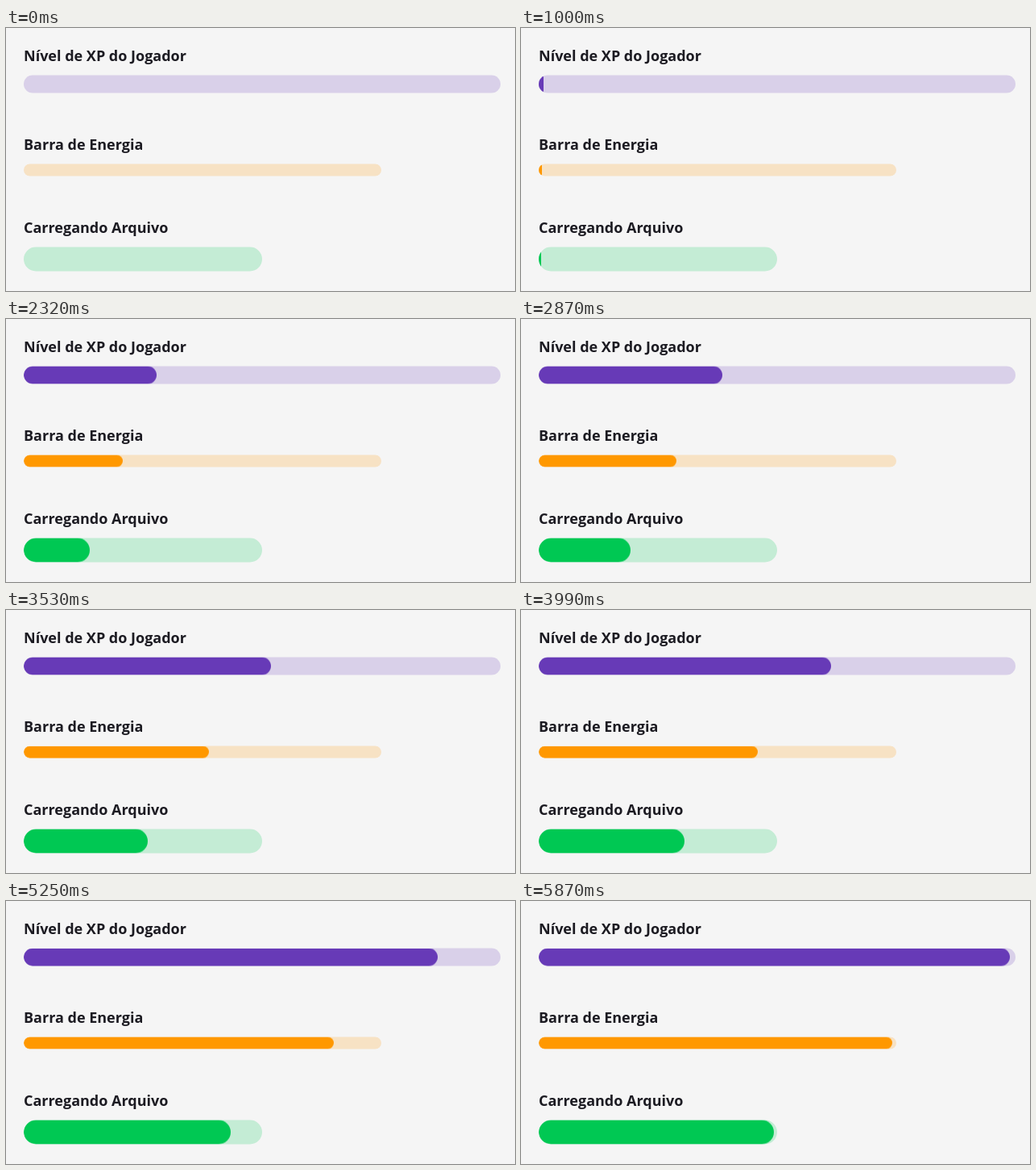
Recreate the animation shown at these times as an HTML page. Size 632 px wide and 326 px high, loop 7380 ms.

```html
<!DOCTYPE html>
<html lang="pt-BR">
<head>
<meta charset="utf-8">
<title>Barras de progresso</title>
<style>
  html, body {
    margin: 0;
    width: 100%;
    height: 100%;
    overflow: hidden;
    background: #f5f5f5;
  }
  .label {
    position: absolute;
    left: 22px;
    font: 700 18px/24px "Open Sans", "Noto Sans", sans-serif;
    color: #1c1b22;
    white-space: nowrap;
  }
  .track {
    position: absolute;
    left: 22px;
    border-radius: 15px;
    overflow: hidden;
    transform: translateY(0.5px);
  }
  .fill {
    height: 100%;
    border-radius: 15px;
    background: var(--color);
    animation: grow 7380ms infinite, show 7380ms step-end infinite;
  }
  .xp     { --color: #673ab7; top: 58px;  width: 592px; height: 22px; background: #d9d0e9; }
  .energy { --color: #ff9800; top: 168px; width: 444px; height: 15px; background: #f7e2c4; }
  .file   { --color: #00c853; top: 271px; width: 296px; height: 30px; background: #c4ecd5; }

  /* 15 updates per second, then a hold just short of full */
  @keyframes grow {
    0% { width: 1%; animation-timing-function: step-end; }
    13.211% { width: 1%; animation-timing-function: steps(73, end); }
    79.19%, 100% { width: 98.8%; }
  }
  @keyframes show {
    0% { opacity: 0; }
    13.54%, 100% { opacity: 1; }
  }
</style>
</head>
<body>
  <div class="label" style="top: 22px">Nível de XP do Jogador</div>
  <div class="track xp"><div class="fill"></div></div>

  <div class="label" style="top: 132px">Barra de Energia</div>
  <div class="track energy"><div class="fill"></div></div>

  <div class="label" style="top: 235px">Carregando Arquivo</div>
  <div class="track file"><div class="fill"></div></div>
</body>
</html>
```
